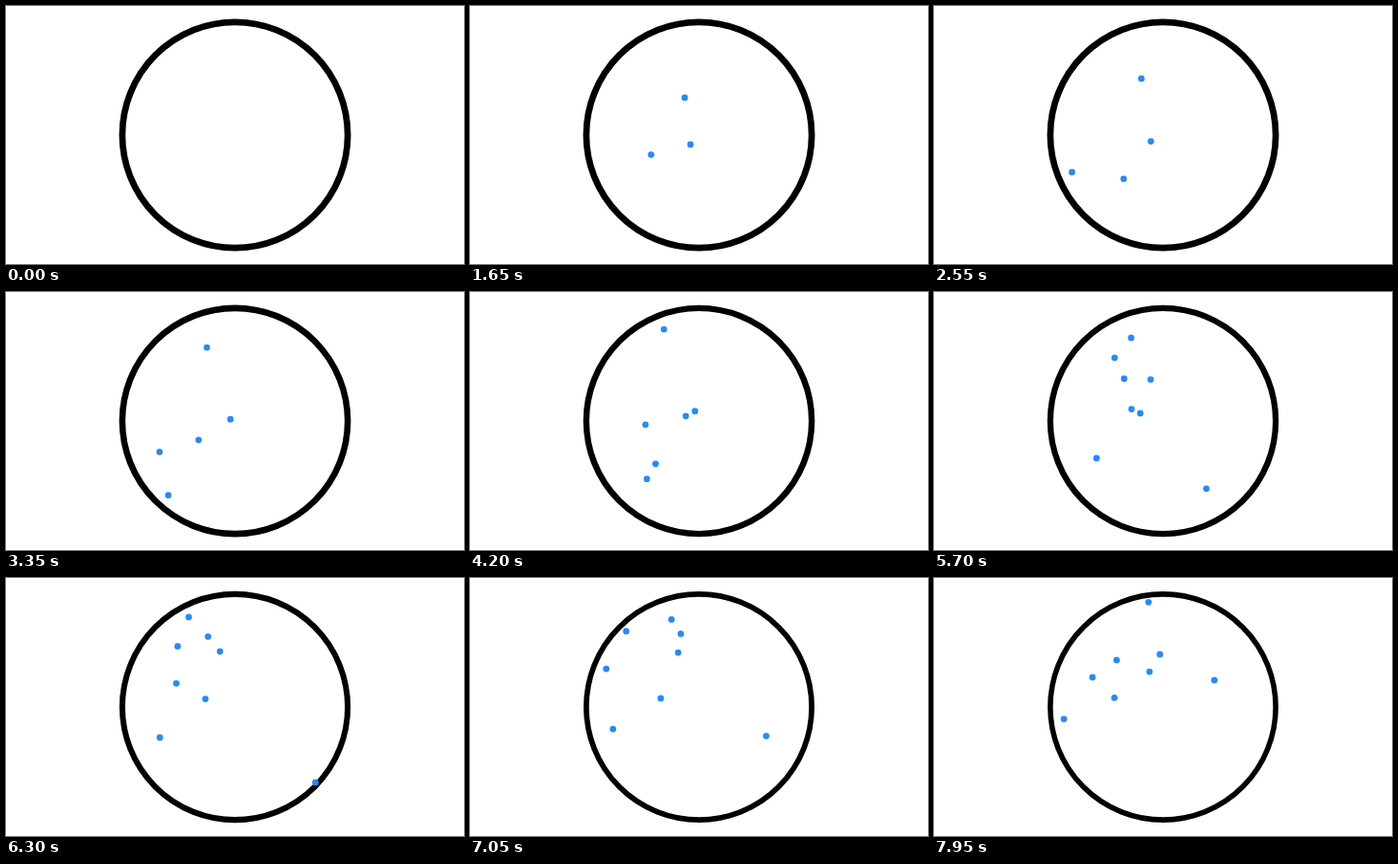
Recreate the animation shown at these times as an HTML page. Size 480 by 270 pixels, loop 8 s.

```html
<!DOCTYPE html>
<html lang="en">
<head>
<meta charset="utf-8">
<title>Bouncing balls</title>
<style>
  html, body { margin: 0; width: 100%; height: 100%; overflow: hidden; background: #fff; }
  svg { display: block; width: 100vw; height: 100vh; }
</style>
</head>
<body>
<svg id="stage" viewBox="-240 -135 480 270">
  <circle id="ring" r="118.125" fill="none" stroke="#000"/>
</svg>
<script>
// Lengths in pixels from the ring's centre, times in seconds.
const BALL_RADIUS = 3.375, BALL_COLOR = '#248aff';
const WALL = 115.9;
const RING_WIDTH = 6.75, WEAR = 0.16875;

const FRAMES = 160, FRAME_MS = 50;
const STEPS_PER_FRAME = 250, DT = FRAME_MS / 1000 / STEPS_PER_FRAME;
const LEAD_STEPS = 500, SPAWN_STEPS = 3750;

// Velocity of each ball as it leaves the centre.
const launches = [
  [-8.55, -22.3], [-50.2, 20.5], [-35.861, 39.866], [-31.8, 16.492],
  [-10.65, -3.95], [-7.7, -18.7], [-29.164, -38], [-49, -17.19]
];

function hitsWall(ball) {
  const dist = Math.hypot(ball.x, ball.y);
  if (dist < WALL) return false;
  const nx = ball.x / dist, ny = ball.y / dist;
  const speed = ball.vx * nx + ball.vy * ny;
  if (speed <= 0) return false;
  ball.vx -= 2 * speed * nx;
  ball.vy -= 2 * speed * ny;
  return true;
}

// Equal masses swap their speeds along the line between the centres.
function collide(a, b) {
  const dx = b.x - a.x, dy = b.y - a.y;
  const dist = Math.hypot(dx, dy);
  if (dist > 2 * BALL_RADIUS) return;
  const nx = dx / dist, ny = dy / dist;
  const speed = (a.vx - b.vx) * nx + (a.vy - b.vy) * ny;
  if (speed <= 0) return;
  a.vx -= speed * nx;
  a.vy -= speed * ny;
  b.vx += speed * nx;
  b.vy += speed * ny;
}

function simulate() {
  const balls = [], frames = [{ spots: [], hits: 0 }];
  let hits = 0;
  for (let step = -LEAD_STEPS; frames.length < FRAMES; step++) {
    if ((step + LEAD_STEPS) % SPAWN_STEPS === 0 && balls.length < launches.length) {
      const [vx, vy] = launches[balls.length];
      balls.push({ x: 0, y: 0, vx, vy });
    }
    if (step > 0 && step % STEPS_PER_FRAME === 0) {
      frames.push({ spots: balls.map(({ x, y }) => [x, y]), hits });
    }
    for (const ball of balls) {
      ball.x += ball.vx * DT;
      ball.y += ball.vy * DT;
      if (hitsWall(ball)) hits++;
    }
    balls.forEach((a, i) => {
      for (let j = i + 1; j < balls.length; j++) collide(a, balls[j]);
    });
  }
  return frames;
}

const stage = document.getElementById('stage');
const ring = document.getElementById('ring');
const dots = launches.map(() => {
  const dot = document.createElementNS('http://www.w3.org/2000/svg', 'circle');
  dot.setAttribute('r', BALL_RADIUS);
  dot.setAttribute('fill', BALL_COLOR);
  return stage.appendChild(dot);
});

function draw({ spots, hits }) {
  ring.setAttribute('stroke-width', RING_WIDTH - WEAR * hits);
  dots.forEach((dot, i) => {
    dot.setAttribute('visibility', i < spots.length ? 'visible' : 'hidden');
    if (i >= spots.length) return;
    dot.setAttribute('cx', spots[i][0]);
    dot.setAttribute('cy', spots[i][1]);
  });
}

const frames = simulate();
const start = performance.now();
function tick() {
  const elapsed = performance.now() - start;
  draw(frames[Math.floor(elapsed / FRAME_MS + 1e-6) % FRAMES]);
  requestAnimationFrame(tick);
}
tick();
</script>
</body>
</html>
```
